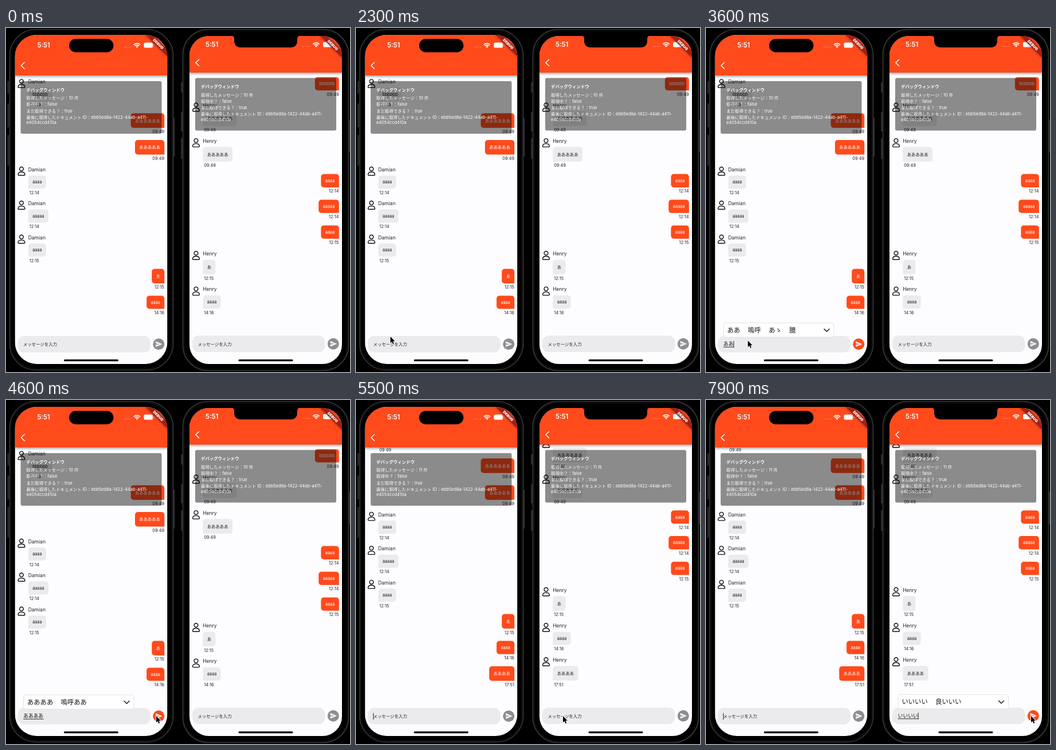
These frames come from a looping animation (600 by 602 pixels, 8 s). An HTML page with a canvas:

```html
<!DOCTYPE html>
<html lang="ja">
<head>
<meta charset="utf-8">
<title>Chat</title>
<style>
html, body { margin: 0; width: 100%; height: 100%; overflow: hidden; background: #000; }
canvas { display: block; width: 600px; height: 602px; }
</style>
</head>
<body>
<canvas></canvas>
<script>
const LOOP = 8000;
const ORANGE = '#ff4a1c', GREY = '#8e8d90', BUBBLE = '#ebeaec', INK = '#242326', PAPER = '#fdfcff';
const FAMILY = 'Inter, "Noto Sans CJK JP", "Noto Sans CJK", sans-serif';
const SMALL = 7.4;

const canvas = document.querySelector('canvas');
const ctx = canvas.getContext('2d');
const ratio = window.devicePixelRatio || 1;
canvas.width = 600 * ratio;
canvas.height = 602 * ratio;

const PLANE = new Path2D('M2 21 23 12 2 3V10L17 12 2 14Z');
const PERSON = new Path2D('M-3.4-3.9a3.4 3.4 0 1 0 6.8 0a3.4 3.4 0 1 0-6.8 0ZM-5.9 6.2C-5.9 2.9-4.4 1.5 0 1.5S5.9 2.9 5.9 6.2Q5.9 7.2 4.9 7.2H-4.9Q-5.9 7.2-5.9 6.2Z');
const ARROW = new Path2D('M0 0V11.2L2.6 8.9 4.4 13 6.3 12.2 4.5 8.2H8Z');
const NOTCH = new Path2D('M-59 0Q-55 0-55 5V8Q-55 20-43 20H43Q55 20 55 8V5Q55 0 59 0V-2H-59Z');

// Conversation as [author, text, time]
const CHAT = [
  ['right', 'bbbbbb', '09:49'],
  ['left', 'ああああああ', '09:49'],
  ['left', 'あああああ', '09:49'],
  ['right', 'aaaa', '12:14'],
  ['right', 'aaaaa', '12:14'],
  ['right', 'aaaa', '12:15'],
  ['left', 'あ', '12:15'],
  ['left', 'aaaa', '14:16'],
];
const REPLY = ['left', 'ああああ', '17:51'];

// unit: size of a logical pixel relative to the right phone
const PHONES = [
  {
    id: 'left', peer: 'Damian', x: 0, y: 0, unit: .992, end: 513, sentAt: 4900,
    body: [6.5, 2.5, 285, 596, 46], screen: [15.5, 12, 266, 576, 38], header: 83,
    buttons: [[2.5, 93, 22], [2.5, 132, 42], [2.5, 187, 54], [291.5, 157, 68]],
    clock: [54.5, 30], iconX: 228.5,
    focusAt: 2700, keys: [3350, 3550, 3750, 3950], letter: 'あ', fieldY: 553.5,
    choices: { 1: 'あ 亜 阿 吾 ア', 2: 'ああ 嗚呼 あゝ 臆', 3: 'あああ 嗚呼あ', 4: 'ああああ 嗚呼ああ' },
  },
  {
    id: 'right', peer: 'Henry', x: 304.5, y: -5.5, unit: 1, end: 512.7, sentAt: 5000,
    body: [308.5, 2.5, 289, 597, 44], screen: [320, 14, 266, 574, 34], header: 78,
    buttons: [[305, 95, 18], [305, 147, 34], [305, 193, 36], [597, 160, 58]],
    clock: [348, 29], iconX: 541,
    focusAt: 5900, keys: [6850, 7050, 7250, 7450], letter: 'い', fieldY: 553,
    choices: { 1: 'い 胃 l 違 イ 伊', 2: 'いい 良い 言い 井伊', 3: 'いいい 良いい', 4: 'いいいい 良いいい' },
  },
];

// Pointer path as [time, x, y]
const POINTER = [
  [1800, 92, 602], [2250, 60, 540], [2400, 60, 540], [2650, 73, 547], [4050, 73, 547],
  [4500, 262, 553], [4950, 262, 553], [5450, 361, 553], [5750, 361, 553],
  [6000, 377, 553], [7450, 377, 553], [7800, 567, 553], [8000, 567, 553],
];

function box(x, y, w, h, radius, fill, stroke, width = 1) {
  ctx.beginPath();
  ctx.roundRect(x, y, w, h, radius);
  if (fill) { ctx.fillStyle = fill; ctx.fill(); }
  if (stroke) { ctx.strokeStyle = stroke; ctx.lineWidth = width; ctx.stroke(); }
}

function line(points, color, width) {
  ctx.beginPath();
  points.forEach(([x, y]) => ctx.lineTo(x, y));
  ctx.strokeStyle = color;
  ctx.lineWidth = width;
  ctx.stroke();
}

function circle(x, y, r, color) {
  ctx.beginPath();
  ctx.arc(x, y, r, 0, Math.PI * 2);
  ctx.fillStyle = color;
  ctx.fill();
}

function setFont(size, weight = 400) {
  ctx.font = `${weight} ${size}px ${FAMILY}`;
}

// y is the visual middle of the line
function label(text, x, y, { size = SMALL, color = INK, align = 'left', weight = 400 } = {}) {
  setFont(size, weight);
  ctx.textAlign = align;
  ctx.fillStyle = color;
  ctx.fillText(text, x, y + size * .36);
}

function at(x, y, draw, scale = 1) {
  ctx.save();
  ctx.translate(x, y);
  ctx.scale(scale, scale);
  draw();
  ctx.restore();
}

function drawRow(phone, [author, text, time], top, height) {
  const mine = author === phone.id;
  const size = SMALL * phone.unit;
  setFont(size);
  const width = ctx.measureText(text).width + size * 2;
  const left = mine ? phone.x + 276.3 - width : phone.x + 38.8;
  box(left, top, width, height, mine ? [5, 5, 0, 5] : [5, 5, 5, 0], mine ? ORANGE : BUBBLE);
  label(text, left + size, top + height / 2, { size, color: mine ? '#fff' : INK });
  label(time, phone.x + (mine ? 276 : 40.7), top + height + 6.8, { align: mine ? 'right' : 'left' });
  if (mine) return;
  label(phone.peer, phone.x + 38.7, top - 10.4, { size: 8.5 });
  at(phone.x + 27, top - 7.4, () => {
    ctx.strokeStyle = '#111';
    ctx.lineWidth = 1.4;
    ctx.stroke(PERSON);
  });
}

// Rows stack upwards from the end of the list
function drawMessages(phone, rows) {
  let bottom = phone.end;
  for (const row of [...rows].reverse()) {
    const height = (/[a-z]/.test(row[1]) ? 23.3 : 25.7) * phone.unit;
    const top = bottom - height - 21.6 * phone.unit;
    drawRow(phone, row, top, height);
    bottom = top - (row[0] === phone.id ? 0 : 15.1 * phone.unit);
  }
}

function drawStatus({ clock: [clockX, y], iconX }) {
  label('5:51', clockX, y, { size: 11.4, weight: 600, color: '#fff' });
  for (let i = 0; i < 4; i++) circle(iconX - 22.5 + i * 3.6, y + 3.2, .8, '#ffffff88');
  ctx.strokeStyle = '#fff';
  ctx.lineWidth = 1.6;
  for (const r of [4.4, 7.2]) {
    ctx.beginPath();
    ctx.arc(iconX, y + 4, r, -Math.PI * .75, -Math.PI * .25);
    ctx.stroke();
  }
  circle(iconX, y + 2.8, 1.5, '#fff');
  box(iconX + 12, y - 4.5, 15.5, 9, 2.6, '#fff');
  box(iconX + 28.5, y - 1.5, 1.2, 3, .6, '#ffffffaa');
}

function drawRibbon(right, top) {
  at(right - 15.9, top + 15.9, () => {
    ctx.rotate(Math.PI / 4);
    ctx.save();
    ctx.shadowColor = '#00000080';
    ctx.shadowBlur = 4 * ratio;
    ctx.fillStyle = '#a21f16';
    ctx.fillRect(-27, -4, 54, 8.1);
    ctx.restore();
    label('DEBUG', 0, 0, { size: 6.6, weight: 900, color: '#fff', align: 'center' });
  });
}

function drawHeader(phone) {
  const [sx, sy, sw] = phone.screen;
  ctx.save();
  ctx.shadowColor = '#00000060';
  ctx.shadowBlur = 4 * ratio;
  ctx.shadowOffsetY = 1.5 * ratio;
  ctx.fillStyle = ORANGE;
  ctx.fillRect(sx, sy, sw, phone.header - sy);
  ctx.restore();

  const cx = phone.x + 29, cy = phone.header - 17.2;
  line([[cx + 3, cy - 5.5], [cx - 2.6, cy], [cx + 3, cy + 5.5]], '#fff', 1.6);

  drawStatus(phone);
  if (phone.id === 'left') {
    box(110, 19, 77.5, 23.5, 12, '#000');
  } else {
    at(sx + sw / 2, sy, () => {
      ctx.fillStyle = '#000';
      ctx.fill(NOTCH);
    });
  }
  drawRibbon(sx + sw, sy);
}

function drawDebugPanel({ x, y }, count) {
  box(x + 25.5, y + 93, 246, 92, 3, 'rgba(0,0,0,.45)');
  label('デバッグウィンドウ', x + 35.5, y + 108.3, { weight: 700, color: '#fff' });
  [
    [122.5, `取得したメッセージ：${count} 件`],
    [133.8, '取得中？：false'],
    [145, 'まだ取得できる？：true'],
    [156, '最後に取得したドキュメント ID：ebb5ed8a-1422-44ab-a411-'],
    [165.5, 'e4054ccd410a'],
  ].forEach(([dy, text]) => label(text, x + 35.5, y + dy, { color: '#fff' }));
}

function drawChoices(phone, text) {
  const size = 11.3, x = phone.x + 30.5, y = phone.fieldY - 37.5, middle = y + 12.8;
  box(x, y, 192.5, 25, 4, '#fff', '#dedde0', .8);
  let left = x + 6.5;
  for (const word of text.split(' ')) {
    const width = word.length * size;
    label(word, left + width / 2, middle, { size, color: '#111', align: 'center' });
    left += width + 13.5;
  }
  const cx = x + 180;
  line([[cx - 4.5, middle - 2], [cx, middle + 2.4], [cx + 4.5, middle - 2]], '#111', 1.4);
}

function drawInput(phone, t) {
  const { x, fieldY: y, keys, focusAt } = phone;
  const sent = phone.id === 'left' && t >= phone.sentAt;
  const typed = sent ? 0 : keys.filter(k => t >= k).length;
  const left = x + 30.3, size = 8.7, caretX = left + typed * size + (typed ? .6 : 0);

  box(x + 20.5, y - 14.7, 231.3, 29, 11, BUBBLE);
  if (!typed || t - keys[0] < 120) label('メッセージを入力', left - .3, y);
  if (typed) {
    label(phone.letter.repeat(typed), left, y - .5, { size, weight: 500, color: '#111' });
    line([[left, y + 4.8], [left + typed * size, y + 4.8]], '#111', .9);
  }
  const blinkOff = typed === 4 && t - keys[3] > 500;
  if (t >= focusAt && !blinkOff) line([[caretX, y - 5.5], [caretX, y + 5.5]], '#222', 1);

  circle(x + 266.3, y - .3, 10, typed ? ORANGE : GREY);
  at(x + 266.6, y - .3, () => {
    ctx.translate(-12, -12);
    ctx.fillStyle = '#fff';
    ctx.fill(PLANE);
  }, .54);
  if (typed) drawChoices(phone, phone.choices[typed]);
}

function drawPhone(phone, t) {
  const [bx, by, bw, bh, br] = phone.body;
  const [sx, sy, sw, sh, sr] = phone.screen;
  phone.buttons.forEach(([x, y, h]) => box(x, y, 3, h, 1, '#29292b'));
  box(bx, by, bw, bh, br, '#000', '#39393b', 1.6);
  box(bx + 2.5, by + 2.5, bw - 5, bh - 5, br - 2.5, null, '#171718', 1);

  ctx.save();
  ctx.beginPath();
  ctx.roundRect(sx, sy, sw, sh, sr);
  ctx.clip();
  ctx.fillStyle = PAPER;
  ctx.fillRect(sx, sy, sw, sh);
  const sent = t >= phone.sentAt;
  drawMessages(phone, sent ? [...CHAT, REPLY] : CHAT);
  drawHeader(phone);
  drawDebugPanel(phone, sent ? 11 : 10);
  drawInput(phone, t);
  box(phone.x + 101, sy + sh - 8, 95, 3.2, 1.6, '#000');
  ctx.restore();
}

function drawPointer(t) {
  const next = POINTER.findIndex(([time]) => time > t);
  if (next < 1) return;
  const [t0, x0, y0] = POINTER[next - 1], [t1, x1, y1] = POINTER[next];
  const p = (t - t0) / (t1 - t0), ease = p * p * (3 - 2 * p);
  at(x0 + (x1 - x0) * ease, y0 + (y1 - y0) * ease, () => {
    ctx.strokeStyle = '#fff';
    ctx.lineWidth = 1.8;
    ctx.stroke(ARROW);
    ctx.fillStyle = '#000';
    ctx.fill(ARROW);
  });
}

function frame() {
  const t = performance.now() % LOOP;
  ctx.setTransform(ratio, 0, 0, ratio, 0, 0);
  ctx.lineJoin = ctx.lineCap = 'round';
  ctx.fillStyle = '#000';
  ctx.fillRect(0, 0, 600, 602);
  PHONES.forEach(phone => drawPhone(phone, t));
  drawPointer(t);
  requestAnimationFrame(frame);
}
frame();
</script>
</body>
</html>
```
